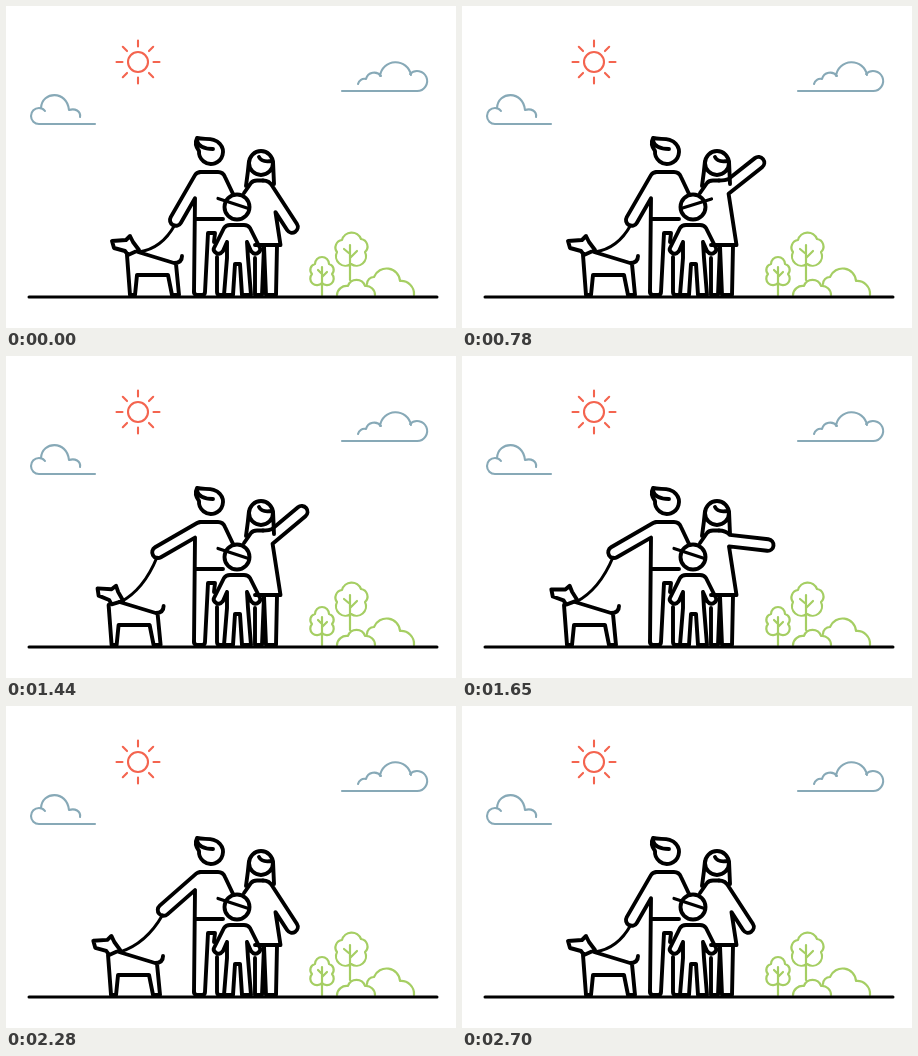
Recreate the animation shown at these times as an HTML page with a canvas. Size 450 by 322 pixels, loop 3.18 s.

```html
<!DOCTYPE html>
<html lang="en">
<head>
<meta charset="utf-8">
<title>Family walk</title>
<style>
  html, body { margin: 0; width: 100%; height: 100%; overflow: hidden; background: #fff; }
  canvas { display: block; }
</style>
</head>
<body>
<canvas id="stage" width="450" height="322"></canvas>
<script>
const ctx = document.getElementById('stage').getContext('2d');
const LOOP = 3180, STEP = 30, RAD = Math.PI / 180;
const BLACK = '#000', RED = '#f4644f', BLUE = '#87a9b7', GREEN = '#a5ce63';
const BOLD = 3.9;

// Eased interpolation through [time, value] keys
function track(t, keys) {
  if (t <= keys[0][0]) return keys[0][1];
  for (let i = 1; i < keys.length; i++) {
    const [t0, v0] = keys[i - 1], [t1, v1] = keys[i];
    if (t < t1) {
      const p = (t - t0) / (t1 - t0);
      return v0 + (v1 - v0) * p * p * (3 - 2 * p);
    }
  }
  return keys[keys.length - 1][1];
}

function stroke(path, color, width) {
  ctx.strokeStyle = color;
  ctx.lineWidth = width;
  ctx.stroke(path);
}

const shape = d => new Path2D(d);

const clouds = shape(
  'M89 118H33A8 8 0 0 1 33 102Q37 102 39 105M35 102C36 85 61 84 63 104C69 102 75 105 74 111' +
  'M336 85H411A10 10 0 1 0 404 68M405 69A15.7 15.7 0 0 0 374 70' +
  'M375 70A8.5 8.5 0 0 0 360 73A6.5 6.5 0 0 0 352 78');

const plants = shape(
  'M336 234A10 10 0 0 1 355 233A7.5 7.5 0 0 1 359 246A9.5 9.5 0 0 1 345 258' +
  'A9.5 9.5 0 0 1 331 246A7.5 7.5 0 0 1 336 234ZM344 274V239M344 252L351 245M344 248L338 243' +
  'M309 258A7 7 0 0 1 323 258A6 6 0 0 1 326 268A6.5 6.5 0 0 1 316 277' +
  'A6.5 6.5 0 0 1 306 268A6 6 0 0 1 309 258ZM316 289V261M316 271L321 266M316 268L312 264' +
  'M331 289A9.5 9.5 0 0 1 342 280A9 9 0 0 1 359 280A9 9 0 0 1 369 289' +
  'M361 278A7 7 0 0 1 368 271A13.5 13.5 0 0 1 394 275A13 13 0 0 1 408 289');

const man = shape(
  'M193 145A12 12 0 1 0 214 138C209 131 199 134 191 132C189 136 190 141 193 145' +
  'M191 135C193 142 200 143 207 143' +
  'M194 166H212Q217 166 219 171L228 190M189 213H217' +
  'M188 285Q188 289 191 289H196Q199 289 199 286L202 227H209L208 236M211 251V286Q211 289 214 289H217');

const woman = shape(
  'M243 157A12 12 0 1 1 267 157A12 12 0 1 1 243 157M243 155Q242 166 240 180M267 155L268 178' +
  'M253 151C255 155 259 156 265 155' +
  'M257 174.5H251Q247 174.5 245 177L238 187' +
  'M249 239H274M249 252V289H256L258 240L260 289H270L271 240');

const childHead = shape('M243.5 201A12.5 12.5 0 1 1 218.5 201A12.5 12.5 0 1 1 243.5 201');
const childBody = shape(
  'M221 236L217 245Q213 250 209 246Q207 244 208 242L218 222Q220 219 224 219H238' +
  'Q242 219 244 222L254 242Q255 244 253 246Q249 250 245 245L241 236' +
  'M221 236V252L218 289H227L229 258H234L236 289H245L242 252L241 236');

const dogBody = shape(
  'M121 249L124 289H129L131 269H162L166 289H173L170 258M132 246L168 257Q176 257 176 250');
const dogHead = shape('M106 235L120 234L124 230L127 236L133 244L122 249L119 245L108 242Z');

function drawSun() {
  const sun = shape('M142 56A10 10 0 1 1 122 56A10 10 0 1 1 142 56');
  for (let i = 0; i < 8; i++) {
    const x = Math.cos(i * 45 * RAD), y = Math.sin(i * 45 * RAD);
    sun.moveTo(132 + 15.5 * x, 56 + 15.5 * y);
    sun.lineTo(132 + 21.5 * x, 56 + 21.5 * y);
  }
  stroke(sun, RED, 2.1);
}

function drawManArm(angle) {
  const a = angle * RAD, x = 194, y = 172, r = 5.8;
  const c = Math.cos(a), s = Math.sin(a);
  const hand = { x: x + 48.5 * c, y: y + 48.5 * s };
  const armpit = y - r * c + (189 - x - r * s) * s / c;
  const path = new Path2D();
  path.arc(x, y, r, -Math.PI / 2, a + Math.PI / 2, true);
  path.arc(hand.x, hand.y, r, a + Math.PI / 2, a - Math.PI / 2, true);
  path.lineTo(189, armpit);
  path.lineTo(188, 286);
  stroke(path, BLACK, BOLD);
  return hand;
}

function drawWomanArm(angle) {
  const a = angle * RAD, x = 262, y = 184, r = 5.8;
  const c = Math.cos(a), s = Math.sin(a);
  const start = 6 - 7 * s, slope = 8.5 / 54;
  // Where the lower edge of the arm meets the side of the dress
  const reach = (266 - x + r * s + slope * r * c) / (c - slope * s);
  const path = new Path2D();
  path.moveTo(257, 174.5);
  path.quadraticCurveTo(263.5, 174.5, x + r * s + start * c, y - r * c + start * s);
  path.arc(x + 44 * c, y + 44 * s, r, a - Math.PI / 2, a + Math.PI / 2);
  path.lineTo(x - r * s + reach * c, y + r * c + reach * s);
  path.lineTo(274.5, 239);
  stroke(path, BLACK, BOLD);
}

function drawDog(dx, tilt, hand) {
  ctx.save();
  ctx.translate(dx, 0);
  stroke(dogBody, BLACK, BOLD);
  ctx.translate(128, 264);
  ctx.rotate(tilt);
  ctx.translate(-128, -264);
  stroke(dogHead, BLACK, BOLD);
  ctx.restore();

  const x0 = hand.x - 1, y0 = hand.y + 5, x1 = 133 + dx, y1 = 246;
  const leash = new Path2D();
  leash.moveTo(x0, y0);
  leash.quadraticCurveTo((x0 + x1) / 2 + 5, (y0 + y1) / 2 + 10, x1, y1);
  stroke(leash, BLACK, 3);
}

function drawChild(turn) {
  stroke(childBody, BLACK, BOLD);
  ctx.fillStyle = '#fff';
  ctx.fill(childHead);
  stroke(childHead, BLACK, BOLD);
  const visor = new Path2D();
  visor.moveTo(212 + 7 * turn, 192.5 + 10 * turn);
  visor.lineTo(242.5 + 7 * turn * turn, 202.5 - 9.5 * turn);
  stroke(visor, BLACK, 3.2);
}

function draw(t) {
  ctx.fillStyle = '#fff';
  ctx.fillRect(0, 0, 450, 322);
  drawSun();
  stroke(clouds, BLUE, 2.1);
  stroke(plants, GREEN, 2.2);
  stroke(man, BLACK, BOLD);
  stroke(woman, BLACK, BOLD);

  drawWomanArm(track(t, [[420, 57], [810, -40], [1110, -22], [1410, -40], [1470, -40], [1840, 57]]));
  const hand = drawManArm(track(t, [[1170, 120], [1440, 150], [1980, 150], [2700, 120]]));
  drawDog(
    track(t, [[1190, 0], [1470, -19], [2270, -19], [2700, 0]]),
    track(t, [[1190, 0], [1440, 0.13], [1900, 0.01], [2270, 0.01], [2700, 0]]),
    hand);
  drawChild(track(t, [[180, 0], [690, 1], [900, 1], [1350, 0]]));
  stroke(shape('M23 291H431'), BLACK, 3);
}

ctx.lineCap = ctx.lineJoin = 'round';
const begin = performance.now();
function tick() {
  const t = (performance.now() - begin) % LOOP;
  draw(Math.floor(t / STEP) * STEP);
  requestAnimationFrame(tick);
}
tick();
</script>
</body>
</html>
```
